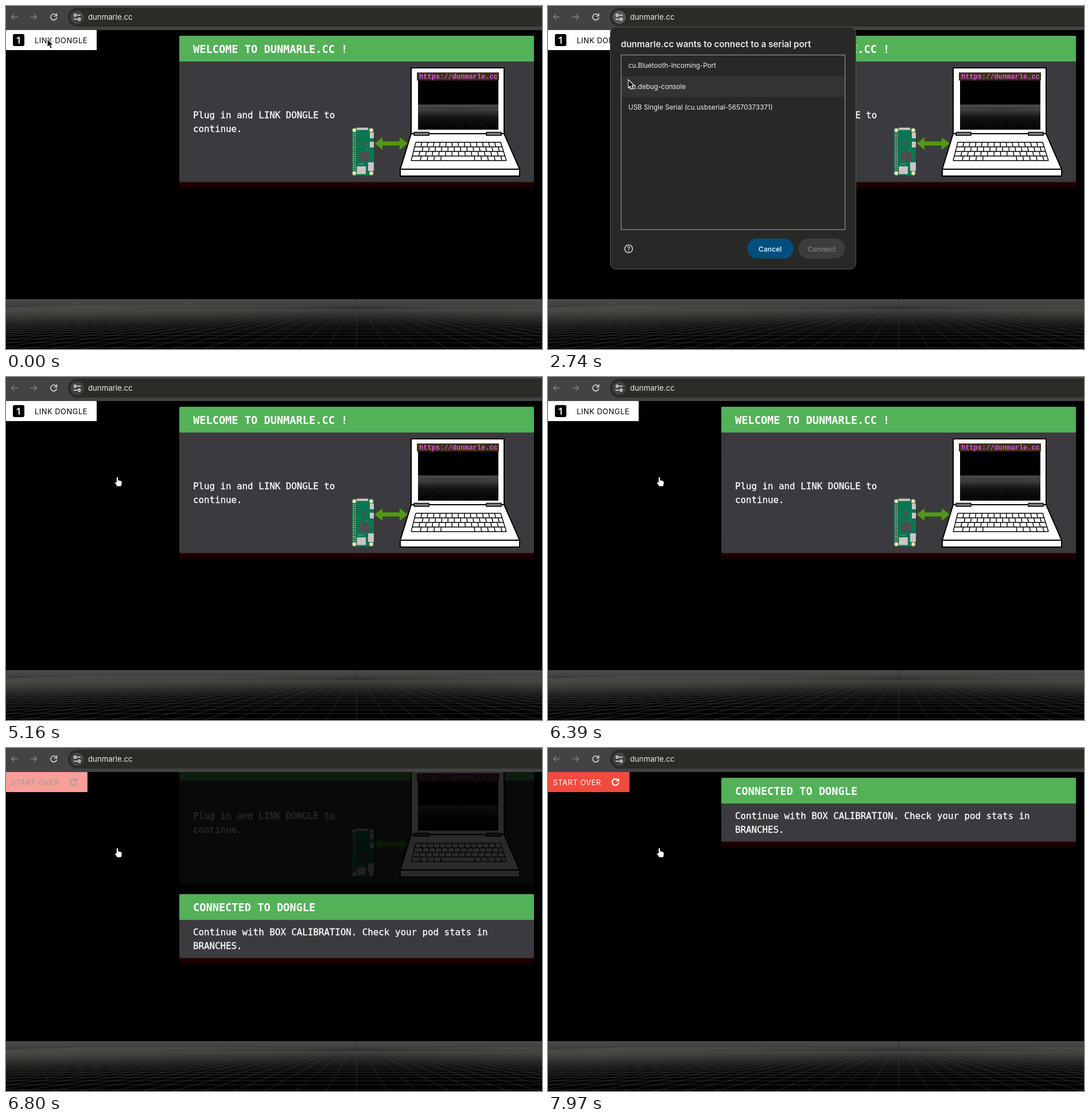
Animation, 934 px wide and 599 px high, one loop 7990 ms. Source, as an HTML page:

```html
<!DOCTYPE html>
<html lang="en">
<head>
<meta charset="utf-8">
<title>Link dongle</title>
<style>
  html, body { margin: 0; height: 100%; overflow: hidden; background: #000; }
  svg { display: block; width: 934px; height: 599px; font-family: Inter, sans-serif; }
  .mono { font-family: "DejaVu Sans Mono", monospace; font-size: 15.8px; fill: #fff; stroke: #fff; stroke-width: .3; }
  .heading { font-size: 18.65px; font-weight: bold; stroke: none; }
  .label { font-size: 13px; letter-spacing: .45px; }
  .port { font-size: 11.6px; fill: #f0f0f0; }
  .action { font-size: 12px; font-weight: 600; text-anchor: middle; }
  .ink { fill: #fff; stroke: #000; stroke-width: 2; stroke-linejoin: round; }
  .line { fill: none; stroke-linecap: round; stroke-linejoin: round; }
</style>
</head>
<body>
<svg viewBox="0 0 934 599">
  <defs>
    <linearGradient id="fog" x2="0" y2="1">
      <stop offset="0" stop-color="#4a4a4a"/>
      <stop offset=".1" stop-color="#434343"/>
      <stop offset=".24" stop-color="#202020"/>
      <stop offset=".5" stop-color="#080808"/>
      <stop offset="1" stop-color="#000"/>
    </linearGradient>
    <linearGradient id="glow" x2="0" y2="1">
      <stop offset="0" stop-color="#260000"/>
      <stop offset="1" stop-color="#120000"/>
    </linearGradient>
    <clipPath id="screen"><rect x="718" y="131" width="140" height="85"/></clipPath>
    <!-- Perspective floor, vanishing point at the local origin -->
    <g id="floor">
      <rect x="-620" width="1240" height="88" fill="url(#fog)"/>
      <path id="grid" fill="none" stroke="#4c4c48" stroke-opacity=".6" stroke-width=".8"/>
      <path d="M0 0V18" stroke="#2c2c2c"/>
    </g>
  </defs>

  <rect width="934" height="599"/>
  <use href="#floor" x="611" y="512"/>

  <g id="welcome">
    <g id="welcomeBody">
      <rect x="302" y="307" width="618" height="12" fill="url(#glow)"/>
      <rect x="302" y="52" width="618" height="255.500" rx="2" fill="#3b3a3e"/>
    </g>
    <g id="welcomeHead">
      <rect x="302" y="52" width="618" height="45" rx="2" fill="#53b158"/>
      <text class="mono heading" x="326" y="81.500">WELCOME TO DUNMARLE.CC !</text>
    </g>
    <g id="welcomeContent">
      <text class="mono" x="326" y="196">Plug in and LINK DONGLE to</text>
      <text class="mono" x="326" y="219.500">continue.</text>

      <!-- Board -->
      <rect x="602.500" y="213" width="38.500" height="83" rx="4" fill="#0a7651"/>
      <rect x="604" y="221" width="6" height="68" fill="#164b38"/>
      <path d="M605.500 222V289M608.500 222V289" stroke="#e4dfba" stroke-width="1.800" stroke-dasharray="1.800 1.500"/>
      <g fill="#fff" stroke="#cdb878" stroke-width="1.800">
        <circle cx="607" cy="217" r="2.800"/><circle cx="636.500" cy="217" r="2.800"/>
        <circle cx="607" cy="292" r="2.800"/><circle cx="636.500" cy="292" r="2.800"/>
      </g>
      <path d="M611 212.500h20v4h-20zM634 221h7v10h-7zM634 237h7v10h-7zM631 273h10v15h-10zM611.500 280h15.500v13.500h-15.500z" fill="#c9c6c5"/>
      <path d="M616 254h17v17h-17zM621 236h5v8h-5zM611 231h3v4h-3z" fill="#4b4f4d"/>
      <path d="M614 276h10M630 249v3" stroke="#a5c8b8" stroke-dasharray="1.500 1"/>

      <path d="M642.500 240 656 229.500V236.500H686V229.500L700 240 686 251V243.500H656V251Z" fill="#549718" stroke="#3f7d12"/>

      <!-- Laptop -->
      <g class="ink">
        <rect x="706" y="108" width="162" height="115"/>
        <path d="M706 223H868L895 285H687Z"/>
        <rect x="687" y="285" width="208" height="12"/>
        <path id="keys" style="fill:none" stroke-width="1.400"/>
        <path d="M711 220.500h26v5.500h-26zM837 220.500h26v5.500h-26z" style="fill:#777" stroke-width="1.500"/>
      </g>
      <rect x="718" y="130" width="140" height="86"/>
      <g clip-path="url(#screen)"><use href="#floor" transform="translate(788 172) scale(.5)"/></g>
      <rect x="716" y="116" width="143" height="14" fill="#3c3013"/>
      <text x="720" y="127" font-family="Liberation Mono, monospace" font-size="12" font-weight="bold" fill="#df52e6">https://dunmarle.cc</text>
    </g>
  </g>

  <g id="connected">
    <rect x="302" y="111" width="618" height="12" fill="url(#glow)"/>
    <rect x="302" width="618" height="111.500" rx="2" fill="#3b3a3e"/>
    <rect x="302" width="618" height="45" rx="2" fill="#53b158"/>
    <text class="mono heading" x="326" y="29.500">CONNECTED TO DONGLE</text>
    <text class="mono" x="326" y="72">Continue with BOX CALIBRATION. Check your pod stats in</text>
    <text class="mono" x="326" y="95.500">BRANCHES.</text>
  </g>

  <g id="linkButton">
    <rect y="42" width="158" height="35" rx="1" fill="#fff"/>
    <rect x="12" y="49" width="20" height="21" rx="3"/>
    <path d="M19.500 56.500 22.800 54.500V65" class="line" stroke="#fff" stroke-width="2"/>
    <text class="label" x="50" y="64.500">LINK DONGLE</text>
  </g>
  <g id="startOver">
    <rect id="startFace" y="42" width="142" height="35" rx="1"/>
    <g id="startInk">
      <text class="label" x="8.500" y="64.500" stroke="none">START OVER</text>
      <path class="line" d="M121.500 55.500A5.600 5.600 0 1 0 123 61" stroke-width="2"/>
      <path d="M124 52.500V58.500H118Z" stroke="none"/>
    </g>
  </g>

  <!-- Browser bar -->
  <rect width="934" height="42" fill="#434344"/>
  <rect x="108" y="3" width="850" height="33" rx="16.500" fill="#2b2b28"/>
  <g class="line" stroke-width="1.500">
    <path d="M20 19H9.500M14 14.500 9.500 19 14 23.500M43 19H53.500M49 14.500 53.500 19 49 23.500" stroke="#818181"/>
    <path d="M87 15.500A5.300 5.300 0 1 0 88.300 20.500M88.500 13.500V17.500H84.500" stroke="#e0e0e0"/>
  </g>
  <circle id="siteIcon" cx="124" cy="19.500" r="11.500"/>
  <g class="line" stroke="#eee" stroke-width="1.500">
    <path d="M124.500 16H129.500M118.500 23H123.500"/>
    <circle cx="120.500" cy="16" r="1.900"/><circle cx="127.500" cy="23" r="1.900"/>
  </g>
  <text x="143" y="24" font-size="13.200" fill="#ececec">dunmarle.cc</text>

  <g id="dialog">
    <rect x="108.500" y="36.500" width="428" height="423" rx="10" fill="#282827" stroke="#565656"/>
    <text x="127" y="72" font-size="15.200" font-weight="600" fill="#e9e9e9">dunmarle.cc wants to connect to a serial port</text>
    <rect x="128" y="123" width="389" height="36" fill="#333332"/>
    <rect x="127.500" y="85.500" width="390" height="305" fill="none" stroke="#a2a2a0"/>
    <text class="port" x="140" y="108">cu.Bluetooth-Incoming-Port</text>
    <text class="port" x="140" y="144.500">cu.debug-console</text>
    <text class="port" x="140" y="181">USB Single Serial (cu.usbserial-56570373371)</text>
    <circle cx="140.500" cy="424" r="6.800" fill="none" stroke="#ddd" stroke-width="1.500"/>
    <text class="action" x="140.500" y="428" style="font-size:10.500px" fill="#ddd">?</text>
    <rect x="347" y="406" width="81.500" height="35" rx="17.500" fill="#004f7d"/>
    <text class="action" x="387" y="428.500" fill="#d3e9f7">Cancel</text>
    <rect x="436.500" y="406" width="81" height="35" rx="17.500" fill="#3d3d3c"/>
    <text class="action" x="477" y="428.500" fill="#7b7b7a">Connect</text>
  </g>

  <path id="arrow" d="M0 0V14.500L3.300 11.500 5.600 17 8.300 15.800 6 10.500H10.500Z" fill="#000" stroke="#fff" stroke-width="1.100" stroke-linejoin="round"/>
  <path id="hand" transform="translate(189 174)" d="M3.500 10V2Q3.500 .5 5 .5T6.500 2V6.500Q8 5.500 9 7 10.500 6.200 11.200 7.700 13 7.500 13 9.500V12.500Q12.500 15 11.500 17H4.500Q3 14 .8 11.500 .3 9.500 2 9.500Z" fill="#fff" stroke="#111" stroke-width=".8"/>
</svg>
<script>
const LOOP = 7990;
const OPEN = 870, CLOSE = 4990;       // port chooser
const MOVE = 2200, MOVE_END = 3200;   // pointer travel
const LINKED = 6480, REMOVED = 7110;  // cards swap

const $ = id => document.getElementById(id);
const clamp = v => Math.min(1, Math.max(0, v));
const mix = (a, b, p) => a + (b - a) * p;
const progress = (t, from, to) => clamp((t - from) / (to - from));
const settle = (dt, tau) => 1 - Math.exp(-Math.max(0, dt) / tau);
const show = (id, on) => { $(id).style.display = on ? '' : 'none'; };
const place = (id, x, y) => $(id).setAttribute('transform', `translate(${x} ${y})`);
const rgb = (a, b, p) => `rgb(${a.map((v, i) => Math.round(mix(v, b[i], p)))})`;

function gridPath() {
  let d = '';
  for (let n = 9; n < 45; n++) d += `M-620 ${(760 / n).toFixed(2)}H620`;
  for (let n = -70; n <= 70; n++) d += `M${n * 54 / 8} 11L${n * 54} 88`;
  return d;
}

function keyPath() {
  const rows = 4, columns = 14;
  const at = (u, v) => `${mix(mix(714, 706, v), mix(862, 872, v), u).toFixed(1)} ${238 + 32 * v}`;
  let d = '';
  for (let r = 0; r <= rows; r++) d += `M${at(0, r / rows)}L${at(1, r / rows)}`;
  for (let r = 0; r < rows; r++) {
    for (let c = 0; c <= columns; c++) {
      const edge = c === 0 || c === columns;
      const u = c / columns + (edge ? 0 : (r % 2) * .025);
      if (r === 3 && c > 4 && c < 9) continue;   // space bar
      d += `M${at(u, r / rows)}L${at(u, (r + 1) / rows)}`;
    }
  }
  return d;
}

function render(t) {
  const open = t >= OPEN && t < CLOSE;
  show('dialog', open);
  $('siteIcon').setAttribute('fill', open ? '#585856' : '#444442');

  const p = progress(t, MOVE, MOVE_END), travel = p * p * (3 - 2 * p);
  place('arrow', mix(72, 193, travel), mix(57.5, 184, travel));
  show('arrow', t < CLOSE);
  show('hand', t >= CLOSE);

  const dt = t - LINKED, linked = dt >= 0;
  const leave = settle(dt, 202), shift = 90 * leave;
  show('welcome', t < REMOVED);
  $('welcome').setAttribute('opacity', clamp(1 - leave * 1.05));
  place('welcomeBody', 0, -shift);
  place('welcomeContent', 0, -shift);
  place('welcomeHead', 0, -shift * .56);

  const collapse = 1 - (1 - progress(t, REMOVED, REMOVED + 300)) ** 3;
  show('connected', linked);
  place('connected', 0, mix(334 - 121 * settle(dt, 305), 52, collapse));

  const tint = progress(t, LINKED - 15, LINKED + 615);
  show('linkButton', !linked);
  show('startOver', linked);
  $('startFace').setAttribute('fill', rgb([255, 255, 255], [244, 74, 62], tint));
  const ink = rgb([0, 0, 0], [255, 255, 255], clamp(tint * 1.15));
  $('startInk').setAttribute('fill', ink);
  $('startInk').setAttribute('stroke', ink);
}

$('grid').setAttribute('d', gridPath());
$('keys').setAttribute('d', keyPath());

const start = performance.now();
function tick() {
  render((performance.now() - start) % LOOP);
  requestAnimationFrame(tick);
}
tick();
</script>
</body>
</html>
```
